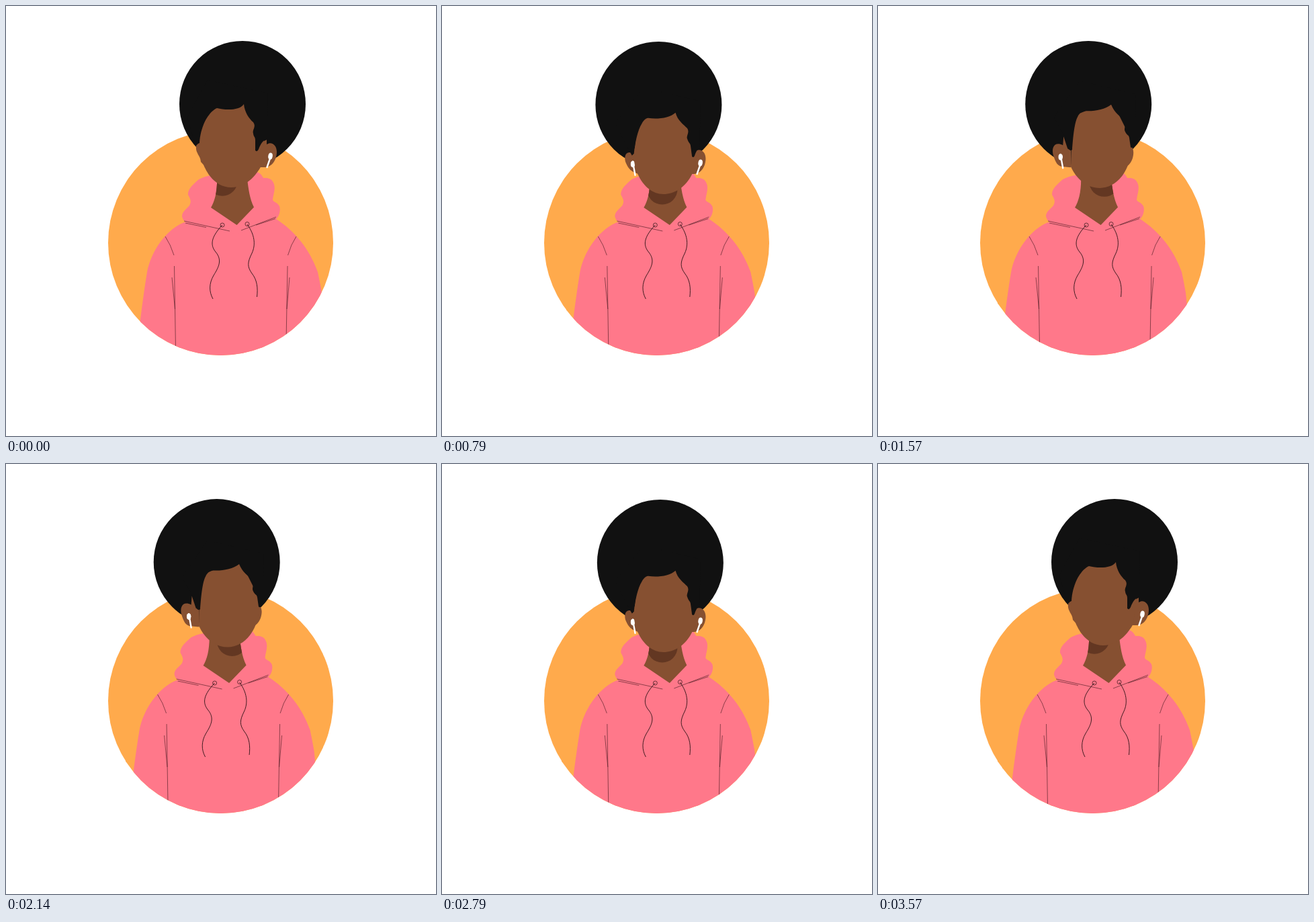
These frames come from a looping animation (640 px wide and 640 px high, 3.64 s). An HTML page:

```html
<!DOCTYPE html>
<html>
<head>
<meta charset="utf-8">
<style>
html, body { margin: 0; height: 100%; overflow: hidden; background: #fff; }
svg { display: block; width: 100%; height: 100%; }
.skin { fill: #865031; }
.hair { fill: #111; }
.pod { fill: #fff; stroke: #fff; stroke-linecap: round; }
.seam { fill: none; stroke: #40161d; stroke-width: .6; }
.cord { fill: none; stroke: #2b1216; stroke-width: .9; }
</style>
</head>
<body>
<svg viewBox="0 0 640 640">
  <defs>
    <clipPath id="disc"><circle cx="319.5" cy="352.5" r="167.5"/></clipPath>
    <path id="neck" d="M314 250C315 275 311 290 305 300L343.5 326L369 299.500C362 285 361 272 358 250Z"/>
    <clipPath id="neckClip"><use href="#neck"/></clipPath>
  </defs>
  <circle cx="319.5" cy="352.5" r="167.5" fill="#ffaa4c"/>
  <circle id="afro" class="hair" r="94"/>
  <g clip-path="url(#disc)">
    <g id="body">
      <g fill="#ff788a">
        <path d="M265 322C238 333 216 365 210 396C206 420 202 450 199 475L190 530H480L470 427Q467 410 464 396C452 362 430 335 402 317Z"/>
        <path d="M306 252C296 253 290 257 287 258C278 266 270 273 271 281C275 288 276 291 273 297C268 303 262 306 262 313C263 318 265 319 267 322L343 340L402 317C407 313 409 303 407 298C403 291 397 292 397 288C398 279 402 271 398 263C395 256 389 256 383 256C380 250 377 248 373 247Z"/>
      </g>
      <use href="#neck" class="skin"/>
      <g clip-path="url(#neckClip)"><circle id="shade" r="22.7" fill="#633722"/></g>
      <path class="seam" d="M265 320L333 335M267 323L298 329.500M350 334L402 314M372 326L401 316.500M237 343Q245 355 250 371M432 343Q424 355 419.500 371M250.500 387L252.500 510M247 404L251.500 451M419 387L417 500M422 404L418 451"/>
      <g class="cord">
        <circle cx="322" cy="326" r="3" stroke-width=".7"/>
        <circle cx="359" cy="324.500" r="3" stroke-width=".7"/>
        <path d="M322 326C306 343 303 355 312 366C322 378 317 388 309 401C302 413 302 425 308 436"/>
        <path d="M359 325C370 340 372 355 366 368C359 382 359 388 366 398C374 408 375 420 373.500 433"/>
      </g>
    </g>
  </g>
  <g id="head">
    <path id="earL" class="skin"/>
    <path id="earR" class="skin" d="M388 206C396 201 403 208 403 217C403 228 397 239 386 240L376 240V214L382 202L388 199Z"/>
    <g id="podL" class="pod">
      <ellipse cx="274.500" cy="223.500" rx="2.700" ry="4.500"/>
      <path d="M275.500 226L278 240" stroke-width="2.400"/>
    </g>
    <g id="podR" class="pod">
      <ellipse cx="393.500" cy="223.500" rx="2.700" ry="4.500" transform="rotate(8 393.500 223.500)"/>
      <path d="M393 227L388.500 240" stroke-width="2.400"/>
    </g>
    <path id="face" class="skin"/>
    <path id="fringe" class="hair"/>
  </g>
</svg>
<script>
const $ = id => document.getElementById(id);
const move = (id, x, y) => $(id).setAttribute('transform', `translate(${x} ${y})`);
const place = (id, x, y) => { $(id).setAttribute('cx', x); $(id).setAttribute('cy', y); };

// Head poses: facing right, starting to turn, facing left (without the nod)
const poses = {
  face: [
    'M314 150C296 160 288 190 288 205C288 236 306 270 335 270C355 270 370 256 380 238L384 200L354 140Z',
    'M306 153C290 165 285 190 285 205C285 235 302 270 329 270C349 270 367 257 377 238L382 198L348 141Z',
    'M297 160C290 170 288 200 287 238C292 250 306 270 330 270C352 270 373 250 377 215L378 200L348 140Z'],
  earL: [
    'M286 205C282 205 282 214 285 219C287 224 289 224 290 232L300 243V218L300 215L300 197Z',
    'M283 207C279 207 278 217 282 223C285 228 288 228 289 233L300 240V218L300 215L300 197Z',
    'M278 206C266 200 260 209 264 222C267 231 270 238 279 238L290 239V214L285 211L279 193Z'],
  fringe: [
    'M300 110L270 165L281 205L284 207L286 204C289 185 294 172 303 161C306 157 311 153 314 152C326 155 348 156 354 146C355 158 362 168 368 173C373 180 366 184 368 190C369 196 371 194 371 200L371 215Q374 218 376 213C379 205 383 199 388 199L390 130Z',
    'M300 110L254 160L277 208L281 209L283 204C285 187 291 172 298 162C301 158 303 155 306 155C322 158 340 156 348 148C350 160 358 165 364 171C368 178 361 182 363 187C365 195 367 193 367 199L369 215Q371 218 373 213C376 203 380 199 384 198L386 130Z',
    'M300 110L262 165L278 193L285 213L289 213C290 198 292 173 297 164C300 157 305 155 309 155C320 156 338 153 347 145.500C352 158 360 162 367 170C370 177 365 181 368 186C371 192 373 190 374 195L376 209Q379 211 380 208C381 206 382 203 382 200L384 130Z']
};

// Cubic ease with end heights 0 and 1, solved by bisection
function ease(x, a, b) {
  let lo = 0, hi = 1, u;
  for (let i = 0; i < 24; i++) {
    u = (lo + hi) / 2;
    if (3 * a * u * (1 - u) ** 2 + 3 * b * u * u * (1 - u) + u ** 3 < x) lo = u; else hi = u;
  }
  return u * u * (3 - 2 * u);
}

const stops = [0, .137, .69, 1];
function mix(e, values) {
  const i = e < stops[1] ? 0 : e < stops[2] ? 1 : 2;
  const f = (e - stops[i]) / (stops[i + 1] - stops[i]);
  return values[i] + (values[i + 1] - values[i]) * f;
}

function morph(e, [a, b, c]) {
  const list = s => s.match(/[\d.]+/g).map(Number);
  const B = list(b), C = list(c);
  let i = 0;
  return a.replace(/[\d.]+/g, n => mix(e, [+n, B[i], C[i], C[i++]]).toFixed(2));
}

function draw(time) {
  // 14 poses a second, there and back in 50 steps
  const p = Math.min(50, Math.floor(time % 3640 * .014 + .1)) / 25;
  const e = ease(p < 1 ? p : 2 - p, .5, .5);
  const sway = p < 1 ? ease(p, .6, 0) : 1 - ease(p - 1, .95, .36);
  const nod = 42.4 * e * (1 - e);
  const dx = -12.2 * e;
  const lift = mix(e, [0, 0, 4, 0]);
  const turn = mix(e, [0, -3, -20, -23]);

  move('body', dx, 0);
  move('head', 0, nod);
  place('afro', 352 - 39 * sway, 146 + 5 * sway * (1 - sway));
  place('shade', mix(e, [322, 322, 335, 337]) - dx, 260 + nod + mix(e, [0, 2, 4, 0]));
  for (const id in poses) $(id).setAttribute('d', morph(e, poses[id]));
  move('fringe', 0, lift);
  move('earL', mix(e, [0, 0, 0, -3]), lift);
  move('earR', turn, 0);
  move('podL', turn + 20, lift);
  move('podR', mix(e, [0, -2.5, -17, -23]), 0);
}

const start = performance.now();
function tick() {
  draw(performance.now() - start);
  requestAnimationFrame(tick);
}
tick();
</script>
</body>
</html>
```
